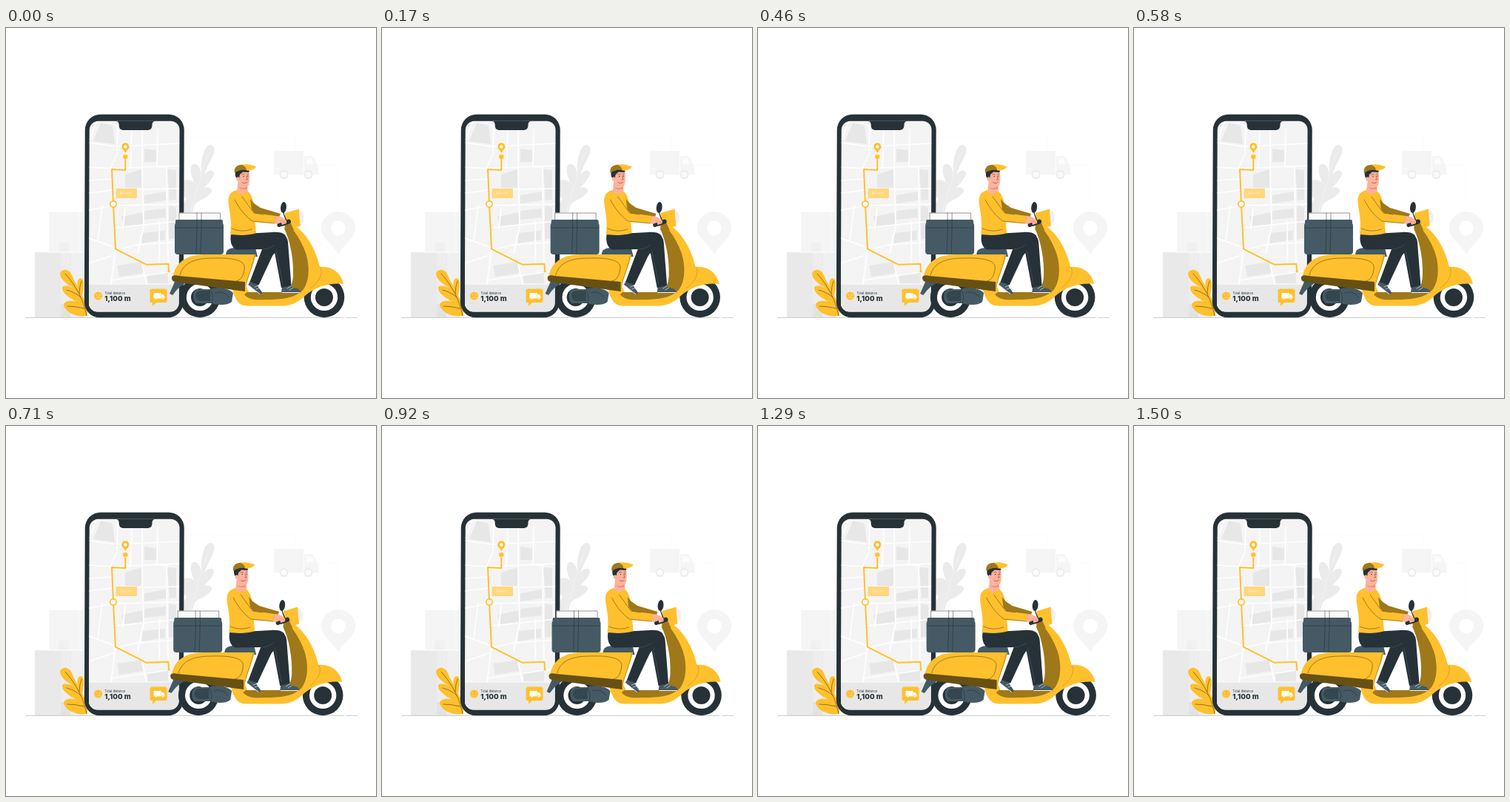
These frames come from a looping animation (500 px wide and 500 px high, 1540 ms). An HTML page with a canvas:

```html
<!DOCTYPE html>
<html lang="en">
<head>
<meta charset="utf-8">
<title>Delivery</title>
<style>
html, body { margin: 0; width: 100%; height: 100%; overflow: hidden; background: #fff; }
canvas { display: block; width: 100vw; height: 100vh; }
</style>
</head>
<body>
<canvas id="stage"></canvas>
<script>
const canvas = document.getElementById('stage');
const ratio = window.devicePixelRatio || 1;
canvas.width = canvas.height = 500 * ratio;
const ctx = canvas.getContext('2d');

const YELLOW = '#ffc02d', OCHRE = '#9f7819', BROWN = '#675013';
const INK = '#263238', SLATE = '#455a64', SKIN = '#ffb29b';
const LOOP = 1540, STEP = 41.6, LAST_STEP = 36;

function fill(d, color) {
  ctx.fillStyle = color;
  ctx.fill(new Path2D(d));
}
function line(d, color, width = 0.6) {
  ctx.strokeStyle = color;
  ctx.lineWidth = width;
  ctx.lineCap = ctx.lineJoin = 'round';
  ctx.stroke(new Path2D(d));
}
function box(x, y, w, h, color, r = 0) {
  ctx.fillStyle = color;
  ctx.beginPath();
  ctx.roundRect(x, y, w, h, r);
  ctx.fill();
}
function oval(x, y, rx, color, ry = rx, turn = 0) {
  ctx.fillStyle = color;
  ctx.beginPath();
  ctx.ellipse(x, y, rx, ry, turn, 0, Math.PI * 2);
  ctx.fill();
}
function text(str, x, y, font, color) {
  ctx.fillStyle = color;
  ctx.font = font + ' Inter, sans-serif';
  ctx.fillText(str, x, y);
}

function drawBackdrop() {
  box(58, 249, 47, 54, '#f5f5f5');
  box(71, 290, 14, 13, '#f0f0f0');
  box(98, 249, 1, 53, '#fafafa');
  box(39, 303, 49, 88, '#e9e9e9');
  box(88, 303, 17, 88, '#f0f0f0');
  box(74, 303, 13, 88, '#ededed');
  box(74, 373, 13, 18, '#e3e3e3');
  line('M58 303H105', '#fff', 1);

  fill('M240 206C248 204 254 207 256 211C250 201 247 188 253 184C259 182 263 191 264 197C263 181 266 164 273 159C279 156 283 161 281 168C279 177 271 187 268 199C271 193 279 190 281 195C282 201 273 211 267 216C273 214 280 217 278 221C274 229 261 233 255 238L252 249H239V239C242 235 243 232 244 230C241 229 239 225 239 222Z', '#ebebeb');
  line('M275 168C265 190 261 211 249 249', '#f5f5f5', 0.7);

  ctx.setLineDash([3, 3]);
  line('M242 148H391V166M423 185H449V247', '#f7f7f7', 0.8);
  ctx.setLineDash([]);

  box(362, 166, 40, 32, '#f5f5f5');
  fill('M403 173H413Q416 174 418 181L422 186V198H403Z', '#f5f5f5');
  fill('M406 176H412Q414 177 416 184H406Z', '#fcfcfc');
  for (const x of [375.5, 408.5]) {
    oval(x, 198, 6, '#ebebeb');
    oval(x, 198, 4, '#fafafa');
  }

  fill('M449 307C445 294 426 286 426 270A23 22 0 0 1 472 270C472 286 453 294 449 307Z', '#f5f5f5');
  oval(449, 270.5, 10, '#fff');

  line('M27 391.3H456M460 391.3H474.5', '#b5babd', 0.8);
}

function drawLeaf() {
  fill('M110 389C99 391 82 387 78 375C78 367 92 367 104 373C92 369 75 360 76 350C80 346 94 351 101 358C92 350 73 344 73 331C76 325 85 325 89 334C91 339 94 345 97 350C95 341 99 336 103 339C107 344 104 354 103 362C107 368 111 378 110 389Z', YELLOW);
  line('M80 332C95 349 105 368 109 389M82 354C92 357 98 361 101 364M83 376Q95 376 106 379M102 342Q99 350 99 359', '#4a4020', 0.6);
}

function drawMap() {
  box(112, 125, 123, 259, '#f4f4f4');

  const blocks = [
    'M128 128L144 132L147 157L118 153Z', 'M187 163L203 165V181H187Z',
    'M161 198L183 191V216H161Z', 'M187 226L216 221V233L187 237Z',
    'M218 191L230 192V232L221 233Z', 'M156 255L185 249V265L160 268Z',
    'M187 247L216 244V256L187 259Z', 'M183 277L215 274V286L184 291Z',
    'M220 240L230 242V284L220 286Z', 'M150 321L184 316L187 331L153 336Z',
    'M190 333L219 330V345H192Z'
  ];
  blocks.forEach(d => fill(d, '#e7e7e7'));
  const roads = [
    'M112 155L148 160L234 156M112 188L143 190L234 186M151 125L150 170L140 192',
    'M184 138V190L186 268L178 304M112 223L145 219L234 217M112 246L145 240L234 238',
    'M205 136L204 187L217 189L219 319M148 270L234 261M148 300L177 293L234 289',
    'M112 284L148 297L142 347M112 318L148 306M184 319L190 347M142 341L234 328',
    'M123 125L113 151M170 138L168 190M112 206L143 204M130 240L124 288M207 262V319M161 243L158 272'
  ];
  roads.forEach(d => line(d, '#fff', 1.7));

  line('M161.3 174V192L143 191L145 238L148 298.7L189.5 319.7L219.5 318.8L220 329', YELLOW, 2);
  line('M218.8 329.5H221.3', YELLOW, 1.5);
  oval(145, 238, 5, YELLOW);
  oval(145, 238, 3.3, '#fff');
  oval(161.3, 174, 3.8, '#ffdf96');
  oval(161.3, 174, 2.8, YELLOW);
  fill('M161.3 168.8C160 165.5 156.2 163.5 156.2 160.4A5.1 5.1 0 0 1 166.4 160.4C166.4 163.5 162.6 165.5 161.3 168.8Z', YELLOW);
  oval(161.3, 160.4, 2.2, '#fff');
  box(148.5, 217, 28.5, 13, '#ffd77d', 0.8);
  text('Main st.', 154, 225, '4.5px', '#fff0cc');
}

function drawPanel() {
  box(112, 347, 123, 37, '#e7e7e7');
  oval(124.5, 362, 5.5, YELLOW);
  line('M122 361Q122 359 123 361M126 361Q127 359 127.5 361M122.5 364Q125 365 127 364', '#fff1cb', 0.6);
  text('Total distance', 133.6, 360, '4.2px', INK);
  text('1,100 m', 133.3, 369.3, '800 9.6px', INK);

  box(194.5, 352.5, 23, 18.5, YELLOW, 2.5);
  fill('M198 369V376L204 370Z', YELLOW);
  box(199.5, 358, 10, 7.5, '#fff');
  fill('M210 360H212.5L214.5 362.7V365.5H210Z', '#fff');
  for (const x of [202.7, 211.7]) {
    oval(x, 365.8, 1.6, YELLOW);
    oval(x, 365.8, 1.1, '#fff');
  }
}

function drawPhone() {
  ctx.save();
  ctx.transform(1, 0, -0.004, 1, 1, 0); // the phone leans very slightly
  box(106.3, 116.7, 134, 274.6, INK, 21);
  ctx.beginPath();
  ctx.roundRect(112.3, 125.7, 121.8, 257.8, 12);
  ctx.clip();
  ctx.transform(1, 0, 0.004, 1, -1, 0);
  drawMap();
  drawPanel();
  fill('M146 125H204C199 126 197.5 127.5 197.5 131C197.5 136 195 138 191 138H159C155 138 152.7 136 152.7 131C152.7 127.5 151 126 146 125Z', INK);
  ctx.restore();
}

function drawWheel(x) {
  oval(x, 363.9, 27.3, INK);
  oval(x, 363.9, 18.2, '#fff');
  oval(x, 363.9, 12, INK);
}

function drawCargo() {
  box(234, 249.5, 55.5, 12, '#fafafa', 0.5);
  line('M234 250H289.5V260M234 250V260M258 250V260M264 250V260', '#4d5559', 0.6);
  box(229, 259, 64, 12, SLATE, 2);
  box(228, 263, 66, 43, SLATE, 4);
  line('M229 270H293M258 259V270L257 305M264 259V270L263 305', INK, 0.6);
}

function drawScooter() {
  fill('M221 359L228 343H244L238 348C232 351 228 358 225 361Z', SLATE);
  drawWheel(262);
  drawWheel(430);

  fill('M258 353H276C283 349 301 351 307 358L305 370C298 376 284 374 278 372H258C252 371 251 355 258 353Z', SLATE);
  fill('M263 355H276V369H263C254 368 254 356 263 355Z', '#34464e');
  line('M276 354C281 361 280 367 278 372M283 358C290 355 297 358 301 364', INK, 0.6);

  fill('M297 307C297 299 303 297 311 297H337L340 309H297Z', SLATE);

  // floor, leg shield and front fender
  fill('M305 350L323 345L328 357H374C383 357 387 352 388 344C390 315 384 290 377 271L390 267C404 276 418 296 424 323C443 321 454 334 456 346C438 344 420 349 405 361C396 370 386 375.5 373 375.5H326C313 375 309 365 305 350Z', YELLOW);
  fill('M376 271C384 287 389 312 388 335C387 350 382 357 371 357H326L322 360C328 367 337 368 350 367C374 367 392 365 402 353C411 340 410 319 405 304C400 290 393 279 386 270Z', OCHRE);
  line('M424 323C430 328 424 344 412 351', '#c9951f', 0.7);

  fill('M226 335C229 317 244 306 269 306H337.5C335 320 329 332 324 348L224 338Z', YELLOW);
  fill('M224 338C224 333 230 334 234 335L323 343V356C292 352 257 347 228 343Q224 342 224 338Z', BROWN);
  line('M235 334C239 318 254 311 279 311C307 310 325 314 322 326C321 334 318 341 311 342', '#765a18', 0.7);
  line('M336 306C334 320 326 337 324 349', '#8a691b', 0.6);

  oval(397.5, 255, 5, '#efefef', 9, -0.15);
  fill('M377 250L396 244.5C396 251 397 260 398 267L386 272L376 271Z', YELLOW);
  fill('M377 263L385 264L389 273L377 273Z', OCHRE);
}

function drawLegs() {
  fill('M373 350L384 348C388 352 397 351 398 356V358H372Z', SLATE);
  line('M373 357.5H397', '#f4f4f4', 1);
  line('M380 352L385 349M383 354L388 351', '#fff', 0.6);
  fill('M357 286C370 277 380 278 381 289L385.5 348L372 351L362 298Z', INK);

  fill('M330 342L340 346C340 352 347 355 346 359L343 360L327 347Z', SLATE);
  line('M327 347L343 359.5', '#f4f4f4', 1);
  line('M336 350L341 348M338 353L343 351', '#fff', 0.6);
  fill('M304 279L360 276C375 275 381 280 378 288C376 296 364 301 360 308L341.5 347.5L329.5 343L346 299L314 299.5C306 300 302 289 304 279Z', INK);
  line('M347 299C352 299 358 297 363 293M365 300L374 346', '#52616a', 0.5);
}

function drawRider() {
  drawLegs();

  // far arm
  fill('M329 233L344 243L371 251L366 263L334 255Z', OCHRE);
  fill('M313 219C304 220 300 226 300.5 235C301 246 306 258 303 279C313 280 326 281 338 277L336 255C336 241 334 230 329 223C325 218 318 218 313 219Z', YELLOW);
  fill('M330 231L336 238V250L332 246Z', OCHRE);

  // near arm and hands
  fill('M305 227C312 220 319 226 322 233L336 250L365 254L363 264L333 262C323 255 309 243 305 227Z', YELLOW);
  line('M309 232C315 244 324 255 333 261L363 264M319 228L335 250L348 252M305 271Q319 277 332 272', '#63501e', 0.6);
  oval(375, 242.5, 3.9, INK, 7.5, 0.1);
  line('M375 249C375 255 379 257 379 262', INK, 1.2);
  line('M382 261.5L374 264.5', INK, 6);
  fill('M365 254C371 254 376 257 379 261L377 265L368 266L363 264Z', SKIN);
  line('M369 266.5L382 262', INK, 5);
  fill('M370 257L379 260V264L373 266Z', SKIN);
  line('M371 260L378 263', '#d97f6e', 0.5);

  // head
  fill('M314 204L326 211L327 220C322 226 313 225 312 220Z', SKIN);
  fill('M314 215C319 217 323 217 326 214V217C321 219 317 218 314 215Z', '#e98d78');
  fill('M312 193L328 192C329.5 200 330 210 327 214C321 217 314 212 313 203Z', SKIN);
  fill('M310 195C311 191 324 190 329 193L328 195L320 194.5L316 198L315 204C311 204 309 200 310 195Z', INK);
  oval(313.5, 204, 2.1, SKIN, 2.8);
  fill('M309 196C307 187 315 183.5 322 185L329 192.5C321 190.5 315 192 309 196Z', OCHRE);
  fill('M319 185C327 183 332 186 338 187C337 191 330 193 325 192.5C325 189 323 187 319 185Z', YELLOW);
  line('M318.5 198Q320.5 196.5 322.5 198M325.5 197.5L328 197M325 200L326.5 205H324.5M319.5 209Q323 211 326 208.5', '#713c35', 0.6);
  oval(321, 200.5, 0.7, INK);
  oval(326.8, 200, 0.7, INK);
}

// Standard "ease" timing curve, solved by bisection.
function ease(p) {
  const curve = (a, b, s) => 3 * a * s * (1 - s) ** 2 + 3 * b * s * s * (1 - s) + s ** 3;
  let low = 0, high = 1;
  for (let i = 0; i < 20; i++) {
    const mid = (low + high) / 2;
    if (curve(0.25, 0.25, mid) < p) low = mid; else high = mid;
  }
  return curve(0.1, 1, low);
}

const SHAKE = [0, -0.5, 1, -2, 2, -2, 2, -2, 1, -0.5, 0];

function shakeAt(ms) {
  const step = Math.min(LAST_STEP, Math.floor(ms / STEP + 0.05));
  const place = step / LAST_STEP * 10;
  const i = Math.min(9, Math.floor(place));
  return SHAKE[i] + (SHAKE[i + 1] - SHAKE[i]) * ease(place - i);
}

const start = performance.now();

function frame() {
  const ms = (performance.now() - start) % LOOP;
  ctx.setTransform(ratio, 0, 0, ratio, 0, 0);
  box(0, 0, 500, 500, '#fff');
  drawBackdrop();
  drawLeaf();
  drawPhone();
  ctx.translate(shakeAt(ms), 0);
  drawCargo();
  drawScooter();
  drawRider();
  requestAnimationFrame(frame);
}
frame();
</script>
</body>
</html>
```
